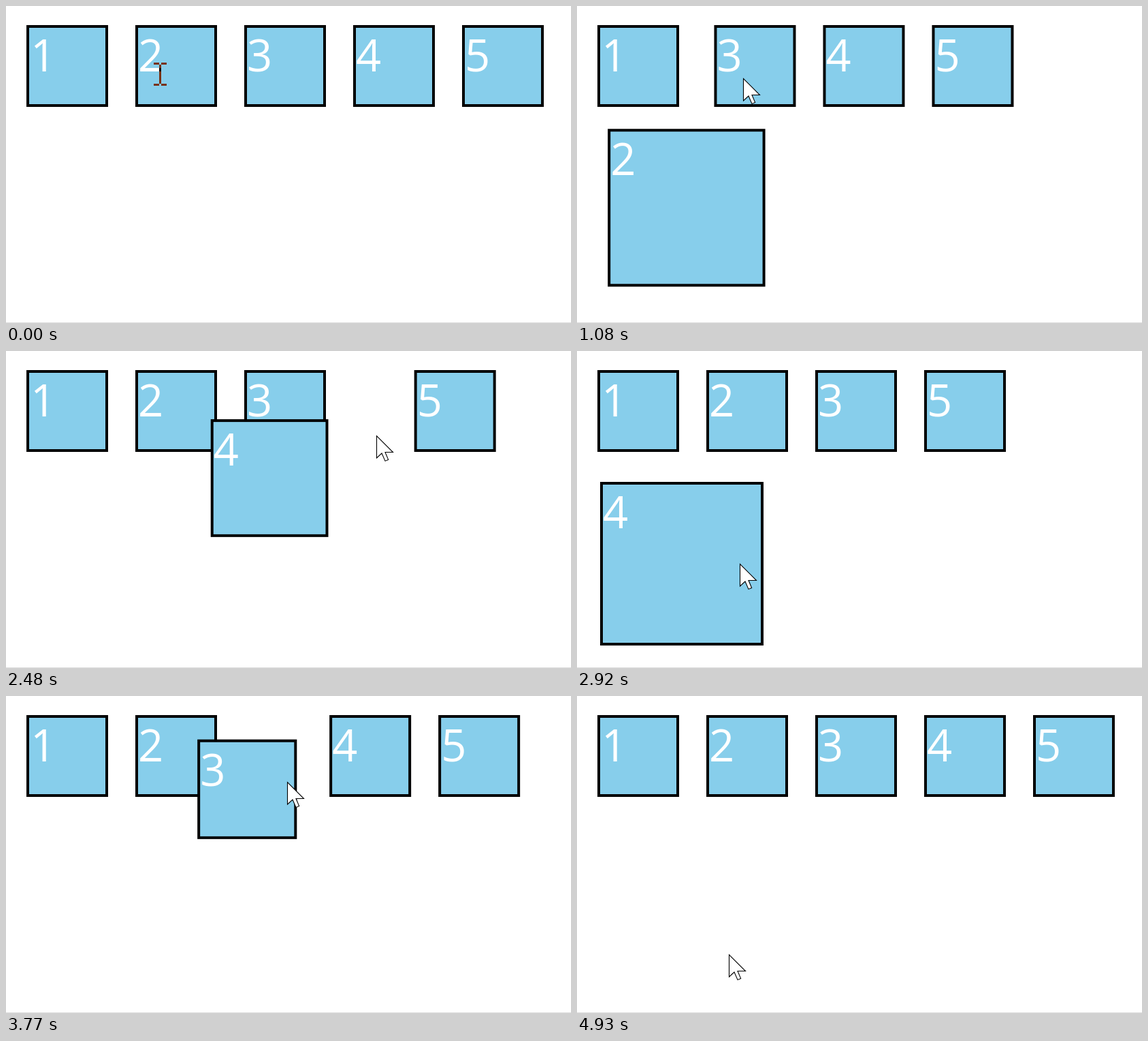
An HTML page for the animation above (5.24 s loop, 830 by 465 pixels).

```html
<!DOCTYPE html>
<html lang="en">
<head>
<meta charset="utf-8">
<title>Box picker</title>
<style>
  html, body { margin: 0; width: 100%; height: 100%; overflow: hidden; background: #fff; }
  svg { display: block; width: 830px; height: 465px; isolation: isolate; }
  .box rect { fill: #87ceeb; stroke: #000; stroke-width: 4; }
  .box text { fill: #fff; font: 65px "Open Sans", "Noto Sans", sans-serif; }
  #beam { fill: #fff; mix-blend-mode: difference; }
  #arrow { fill: #fff; stroke: #000; stroke-width: 1.1; }
</style>
</head>
<body>
<svg id="stage" viewBox="0 0 830 465">
  <rect width="830" height="465" fill="#fff"/>
  <rect y="464" width="830" height="1" fill="#dfdfdf"/>
  <g id="boxes"></g>
  <path id="beam" d="M-9-17h8v3h-8zM2-17h8v3h-8zM-1-14h3v28h-3zM-9 14h8v3h-8zM2 14h8v3h-8z"/>
  <path id="arrow" d="M.5 .5V33L8 26L13 37.4L17.6 35.4L13 24.5H24.5Z"/>
</svg>
<script>
const LOOP = 5240;
const SMALL = 120, LARGE = 240, STEP = 160;
const HOME = { x: 30, y: 28 }, DETAIL = { x: 34, y: 192 };

// Each box opens and closes once: [start, duration] in ms.
const moves = [
  { box: 1, open: [660, 625], close: [1560, 563] },
  { box: 3, open: [2333, 560], close: [3067, 560] },
  { box: 2, open: [3688, 502], close: [4336, 600] }
];

// Pointer stops: time, x, y.
const stops = [
  [430, 226, 100], [530, 244, 106], [1225, 244, 106], [1430, 235, 285],
  [1580, 235, 285], [1930, 310, 209], [2290, 575, 105], [2380, 575, 105],
  [2920, 239, 312], [3060, 225, 316], [3160, 225, 316], [3640, 413, 126],
  [3770, 413, 126], [4190, 223, 379]
];

const SVG = "http://www.w3.org/2000/svg";
const clamp = v => Math.min(1, Math.max(0, v));
const mix = (a, b, p) => a + (b - a) * p;
const smooth = p => p * p * (3 - 2 * p);

// cubic-bezier(.25, .1, .25, 1)
function ease(t) {
  if (t <= 0 || t >= 1) return clamp(t);
  const curve = (s, a, b) => 3 * (1 - s) * (1 - s) * s * a + 3 * (1 - s) * s * s * b + s * s * s;
  let low = 0, high = 1;
  for (let i = 0; i < 24; i++) {
    const mid = (low + high) / 2;
    if (curve(mid, .25, .25) < t) low = mid; else high = mid;
  }
  return curve(low, .1, 1);
}

function add(parent, name) {
  return parent.appendChild(document.createElementNS(SVG, name));
}

const boxes = Array.from({ length: 5 }, (_, i) => {
  const group = add(document.getElementById("boxes"), "g");
  group.setAttribute("class", "box");
  const rect = add(group, "rect");
  rect.setAttribute("x", 2);
  rect.setAttribute("y", 2);
  const label = add(group, "text");
  label.setAttribute("x", i ? 4 : 6);
  label.setAttribute("y", 67.8);
  label.textContent = i + 1;
  return { group, rect };
});
const beam = document.getElementById("beam");
const arrow = document.getElementById("arrow");

function place(node, x, y) {
  node.setAttribute("transform", `translate(${x.toFixed(2)} ${y.toFixed(2)})`);
}

function openness(move, t) {
  const progress = ([start, duration]) => ease((t - start) / duration);
  return progress(move.open) - progress(move.close);
}

function pointerAt(t) {
  const next = stops.findIndex(stop => stop[0] > t);
  if (next <= 0) return stops[next < 0 ? stops.length - 1 : 0].slice(1);
  const a = stops[next - 1], b = stops[next];
  const p = smooth((t - a[0]) / (b[0] - a[0]));
  return [mix(a[1], b[1], p), mix(a[2], b[2], p)];
}

function render(t) {
  const states = moves.map(move => ({ box: move.box, p: openness(move, t) }));
  boxes.forEach(({ group, rect }, i) => {
    let x = HOME.x + i * STEP, y = HOME.y, size = SMALL;
    for (const { box, p } of states) {
      if (i === box) {
        x = mix(x, DETAIL.x, p);
        y = mix(y, DETAIL.y, p);
        size = mix(size, LARGE, p);
      } else if (i > box) {
        x -= STEP * p;
      }
    }
    place(group, x, y);
    rect.setAttribute("width", size - 4);
    rect.setAttribute("height", size - 4);
  });

  const [x, y] = pointerAt(t).map(Math.round);
  const onText = t < 460;
  beam.style.display = onText ? "" : "none";
  arrow.style.display = onText ? "none" : "";
  place(onText ? beam : arrow, x, y);
}

const begin = performance.now();
function tick() {
  render((performance.now() - begin) % LOOP);
  requestAnimationFrame(tick);
}
tick();
</script>
</body>
</html>
```
